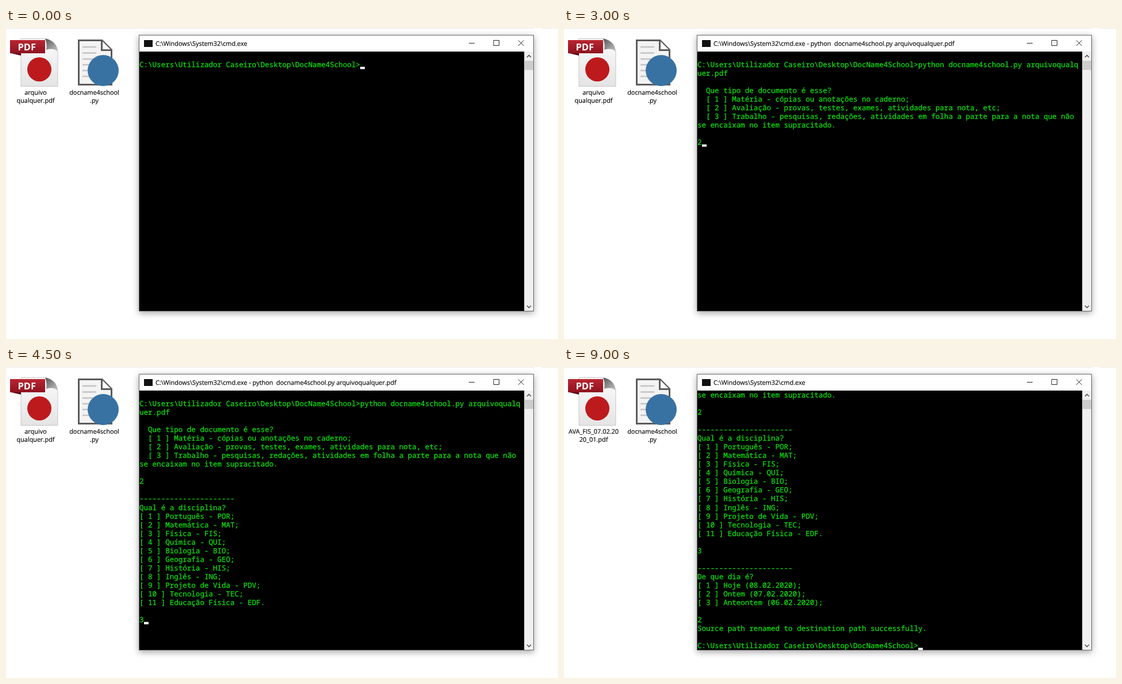
Write an HTML page that moves like this. It is 960x541 px and loops after 10000 ms.

```html
<!DOCTYPE html>
<html lang="pt">
<head>
<meta charset="utf-8">
<title>Renomear documento pelo terminal</title>
<style>
  html, body { margin: 0; width: 100%; height: 100%; overflow: hidden; background: #fff; }
  svg { display: block; width: 960px; height: 541px; }
  text { white-space: pre; text-rendering: geometricPrecision; }
  .ui { font: 10.9px "Open Sans", "Noto Sans", sans-serif; fill: #000; stroke: #000; stroke-width: .15; }
  .label { text-anchor: middle; }
  .badge { font: bold 16.5px "Open Sans", sans-serif; fill: #fff; }
  #screen {
    font: 12.55px "Noto Sans Mono", "DejaVu Sans Mono", monospace;
    fill: #0ee40e; stroke: #0ee40e; stroke-width: .25;
  }
  #window { filter: drop-shadow(0 3px 6px rgba(0, 0, 0, .36)); }
</style>
</head>
<body>
<svg viewBox="0 0 960 541">
  <defs>
    <linearGradient id="paper" x2="0" y2="1">
      <stop stop-color="#fbfbfb"/><stop offset="1" stop-color="#e4e4e4"/>
    </linearGradient>
    <linearGradient id="fold" x2="1" y2="1">
      <stop stop-color="#555"/><stop offset="1" stop-color="#c8c8c8"/>
    </linearGradient>
    <linearGradient id="ribbon" x2="0" y2="1">
      <stop stop-color="#b92631"/><stop offset="1" stop-color="#8e1420"/>
    </linearGradient>
  </defs>

  <path d="M0 .5H918M932 .5H960" stroke="#e9e9e9"/>

  <g id="pdf-file">
    <path d="M26 18.5H68Q87 22 90 41V101.500H26Z" fill="url(#paper)" stroke="#c6c6c6"/>
    <path d="M68 18.500Q72 28 70 38Q82 34 90 41Q88 22 68 18.500Z" fill="url(#fold)"/>
    <path d="M9 44H26V48Z" fill="#5e0c14"/>
    <rect x="7" y="21" width="61" height="23" fill="url(#ribbon)"/>
    <text class="badge" x="20.500" y="38.500">PDF</text>
    <circle cx="58" cy="72" r="21" fill="#bd1a1d"/>
  </g>

  <g id="script-file" fill="none">
    <path d="M126.500 21.500H167L183.500 38V98.500H126.500Z" fill="#f3f3f3" stroke="#5c5c5c" stroke-width="3"/>
    <path d="M166.500 22V38.500H183" fill="#fff" stroke="#5c5c5c" stroke-width="3"/>
    <path d="M133 33H157M133 43.500H157M133 54H157M133 64H157M133 74H157M133 84H157" stroke="#c4c4c4" stroke-width="2.500"/>
    <circle cx="169" cy="74" r="27" fill="#3872a3"/>
  </g>

  <g class="ui label">
    <text id="name1" x="51.500" y="116"></text>
    <text id="name2" x="51.500" y="130"></text>
    <text x="153.500" y="116">docname4school</text>
    <text x="153.500" y="130">.py</text>
  </g>

  <g id="window">
    <rect x="231.500" y="12.500" width="686" height="480" fill="#fff" stroke="#686868"/>
    <rect x="232" y="41" width="669.500" height="451" fill="#000"/>
    <rect x="901.500" y="41" width="15.500" height="451" fill="#f0f0f0"/>
    <rect x="902" y="57" width="15" height="16" fill="#cdcdcd"/>
    <path d="M906 51L909.500 47.500L913 51M906 483L909.500 486.500L913 483" fill="none" stroke="#555" stroke-width="1.600"/>
    <path d="M805 26.500H815M848 21.500H857.500V30.500H848ZM891 21.500L900.500 31M900.500 21.500L891 31" fill="none" stroke="#222"/>
    <rect x="240" y="21" width="15" height="12" fill="#111"/>
  </g>
  <text id="title" class="ui" x="260" y="30.500"></text>
  <g id="screen"></g>
  <rect id="cursor" width="8" height="4" fill="#fff"/>
</svg>

<script>
const LEFT = 232, CELL = 7.53, FIRST_BASELINE = 53, ROW = 15.04, VISIBLE_ROWS = 30;
const STEP = 1500, LOOP = 10000;
const byId = id => document.getElementById(id);

const prompt = "C:\\Users\\Utilizador Caseiro\\Desktop\\DocName4School>";
const rule = "-".repeat(22);
const menu = items => items.map((item, i) => `[ ${i + 1} ] ${item}`).join("\n");

const idle = "\n" + prompt;
const typed = idle + "python docname4school.py arquivoqualq\nuer.pdf";
const askKind = typed + `

  Que tipo de documento é esse?
  [ 1 ] Matéria - cópias ou anotações no caderno;
  [ 2 ] Avaliação - provas, testes, exames, atividades para nota, etc;
  [ 3 ] Trabalho - pesquisas, redações, atividades em folha a parte para a nota que não
se encaixam no item supracitado.

2`;
const askSubject = `${askKind}\n\n${rule}\nQual é a disciplina?\n` + menu([
  "Português - POR;", "Matemática - MAT;", "Física - FIS;", "Química - QUI;",
  "Biologia - BIO;", "Geografia - GEO;", "História - HIS;", "Inglês - ING;",
  "Projeto de Vida - PDV;", "Tecnologia - TEC;", "Educação Física - EDF."
]) + "\n\n3";
const askDay = `${askSubject}\n\n${rule}\nDe que dia é?\n` + menu([
  "Hoje (08.02.2020);", "Ontem (07.02.2020);", "Anteontem (06.02.2020);"
]) + "\n\n";
const done = askDay + "2\nSource path renamed to destination path successfully.\n\n" + prompt;

const screens = [idle, typed, askKind, askSubject, askDay + "1", done];
const shellTitle = "C:\\Windows\\System32\\cmd.exe";
const runningTitle = shellTitle + " - python  docname4school.py arquivoqualquer.pdf";

function drawScreen(content) {
  const rows = content.split("\n").slice(-VISIBLE_ROWS);
  const baseline = row => Math.round(FIRST_BASELINE + row * ROW);
  byId("screen").innerHTML = rows
    .map((line, row) => `<text x="${LEFT}" y="${baseline(row)}">${line.replace(">", "&gt;")}</text>`)
    .join("");
  const last = rows.length - 1;
  byId("cursor").setAttribute("x", Math.round(LEFT + rows[last].length * CELL));
  byId("cursor").setAttribute("y", baseline(last) - 0.5);
}

function showStep(step) {
  const finished = step === screens.length - 1;
  const running = step >= 2 && !finished;
  drawScreen(screens[step]);
  byId("title").textContent = running ? runningTitle : shellTitle;
  byId("name1").textContent = finished ? "AVA_FIS_07.02.20" : "arquivo";
  byId("name2").textContent = finished ? "20_01.pdf" : "qualquer.pdf";
}

let shown = -1;
function tick(now) {
  const step = Math.min(Math.floor(now % LOOP / STEP), screens.length - 1);
  if (step !== shown) showStep(shown = step);
  requestAnimationFrame(tick);
}
requestAnimationFrame(tick);
</script>
</body>
</html>
```
